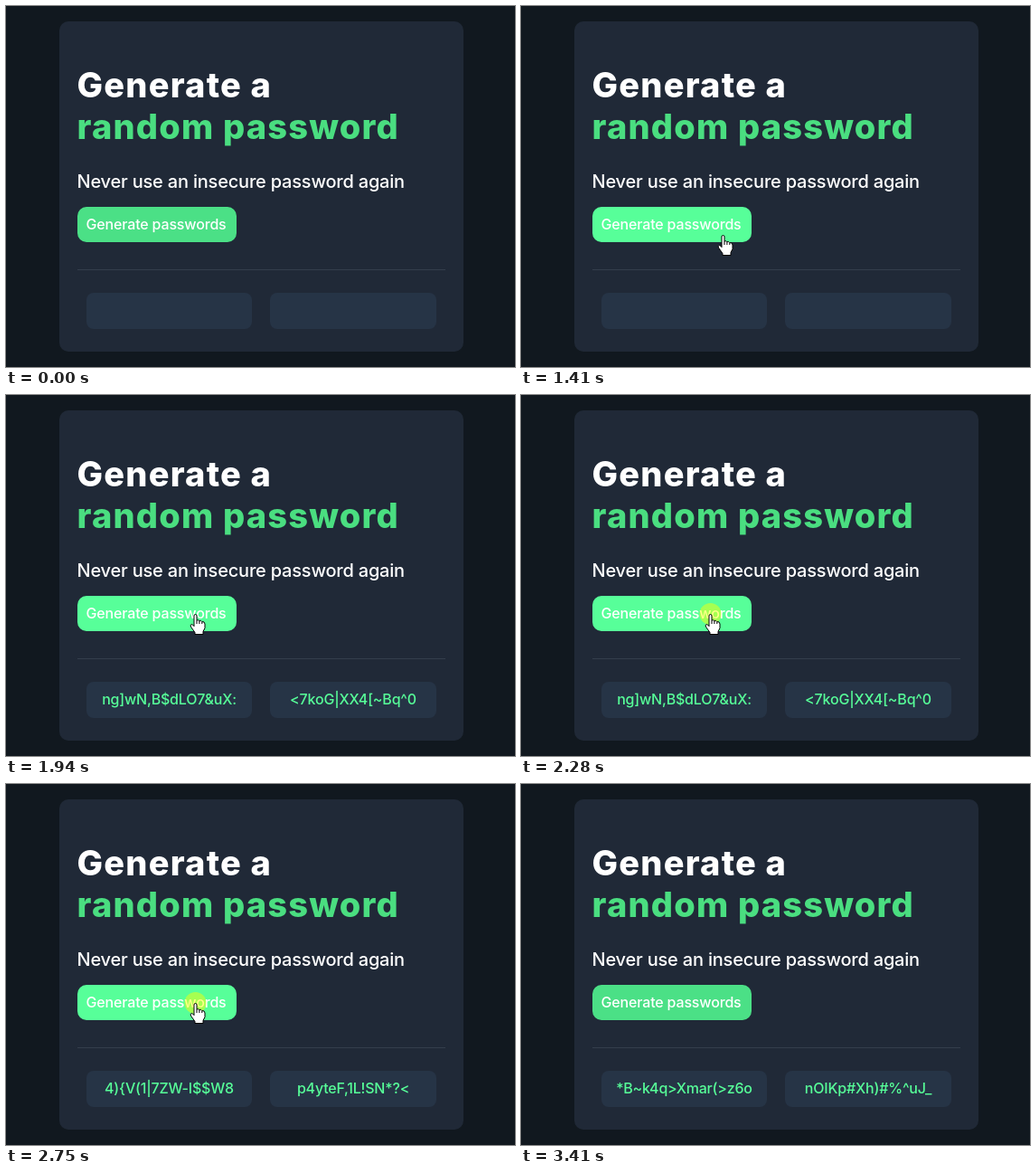
These frames come from a looping animation (563x399 px, 4.75 s). An HTML page with a canvas:

```html
<!DOCTYPE html>
<html lang="en">
<head>
<meta charset="utf-8">
<title>Random password generator</title>
<style>
  html, body { margin: 0; width: 100%; height: 100%; overflow: hidden; background: #11181f; }
  canvas { display: block; width: 563px; height: 399px; }
</style>
</head>
<body>
<canvas id="stage" width="563" height="399"></canvas>
<script>
const ctx = document.getElementById('stage').getContext('2d');
const LOOP = 4750;
const GREEN = '#4ade80';
const BUTTON = '#4be086';
const BRIGHT = '#57ff99';
const FONT = 'Inter, "Liberation Sans", sans-serif';

const arrow = new Path2D('M.5 .8V16.2L4.1 12.8L6.6 18.4L9 17.4L6.5 11.9H11.4Z');
// Hand is drawn with the fingertip at the origin
const hand = new Path2D(
  'M-1.5 2Q-1.5 .5 0 .5Q1.5 .5 1.5 2V7Q3.8 6.2 4.3 7.7Q6.6 7 7.2 8.6' +
  'Q10.2 8 10.5 11V15.5L8.5 19.5V22.5H-.5V20.5L-5 14.2Q-6 11.8-4.3 11.5Q-3 11.4-1.5 13.6Z');
const knuckles = new Path2D('M1.5 7V11M4.4 8V11M7.3 9V11');

// Pointer track: time, x, y
const track = [
  [1200, 289, 320], [1270, 266, 297], [1340, 243, 274], [1410, 223.5, 253],
  [1480, 215.5, 247], [1550, 211.5, 244], [1610, 209.5, 242],
  [3210, 216.5, 251], [3280, 252, 302], [3350, 306, 376]
];
const EXIT = 3410;

// Press time, release time, passwords shown on release
const clicks = [
  [1810, 1940, 'ng]wN,B$dLO7&uX:', '<7koG|XX4[~Bq^0'],
  [2280, 2410, '4){V(1|7ZW-I$$W8', 'p4yteF,1L!SN*?<'],
  [2750, 2880, '*B~k4q>Xmar(>z6o', 'nOIKp#Xh)#%^uJ_']
];

function box(x, y, w, h, r, color) {
  ctx.fillStyle = color;
  ctx.beginPath();
  ctx.roundRect(x, y, w, h, r);
  ctx.fill();
}

function text(str, x, y, size, color, { weight = 500, align = 'left', spacing = -0.01 * size } = {}) {
  ctx.font = `${weight} ${size}px ${FONT}`;
  ctx.letterSpacing = spacing + 'px';
  ctx.textAlign = align;
  ctx.fillStyle = color;
  ctx.fillText(str, x, y);
}

function pointerAt(t) {
  if (t >= EXIT) return null;
  const step = track.findLast(p => p[0] <= t);
  if (!step) return null;
  const [, x, y] = step;
  return { x, y, over: x >= 79 && x < 255 && y >= 222 && y < 261 };
}

function drawPointer({ x, y, over }) {
  ctx.save();
  ctx.translate(x, y);
  ctx.fillStyle = '#fff';
  ctx.strokeStyle = '#000';
  ctx.lineWidth = 1;
  ctx.lineJoin = 'round';
  const shape = over ? hand : arrow;
  ctx.fill(shape);
  ctx.stroke(shape);
  if (over) ctx.stroke(knuckles);
  ctx.restore();
}

function draw(t) {
  const pointer = pointerAt(t);
  const pressed = clicks.some(([down, up]) => t >= down && t < up);
  const shown = clicks.findLast(c => c[1] <= t);

  ctx.fillStyle = '#11181f';
  ctx.fillRect(0, 0, 563, 399);
  box(59, 17, 447, 365, 10, '#202937');

  const title = { weight: 800, spacing: 1.2 };
  text('Generate a', 78.5, 101, 38, '#fff', title);
  text('random password', 78.5, 147, 38, GREEN, title);
  text('Never use an insecure password again', 78.5, 201, 20, '#fff');

  box(79, 222, 176, 39, 10, pointer && pointer.over ? BRIGHT : BUTTON);
  text('Generate passwords', 88.5, 247, 16, '#fff');

  ctx.fillStyle = '#343e4c';
  ctx.fillRect(79, 291, 407, 1);

  box(89, 317, 183, 40, 8, '#263446');
  box(292, 317, 184, 40, 8, '#263446');
  if (shown) {
    const centered = { align: 'center', spacing: -0.2 };
    text(shown[2], 180.5, 342, 16, BRIGHT, centered);
    text(shown[3], 384, 342, 16, BRIGHT, centered);
  }

  if (!pointer) return;
  if (pressed) box(pointer.x - 12, pointer.y - 12, 24, 24, 12, 'rgba(255,255,0,.47)');
  drawPointer(pointer);
}

const start = performance.now();
function tick() {
  draw((performance.now() - start) % LOOP);
  requestAnimationFrame(tick);
}
tick();
</script>
</body>
</html>
```
